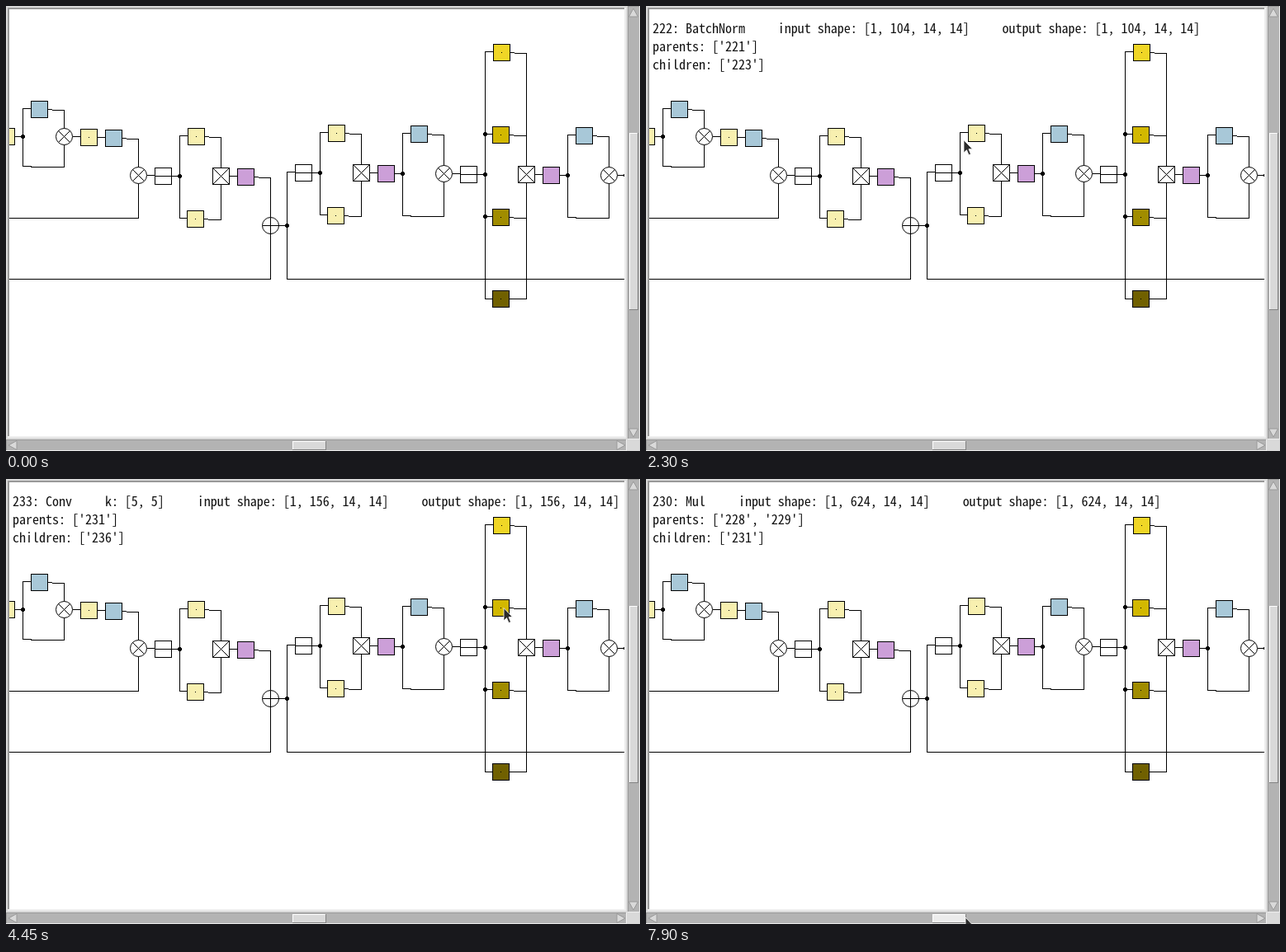
These frames come from a looping animation (768x540 px, 8000 ms). An HTML page:

```html
<!DOCTYPE html>
<html lang="en">
<head>
<meta charset="utf-8">
<title>Network graph viewer</title>
<style>
  html, body { margin: 0; width: 100%; height: 100%; overflow: hidden; background: #d9d9d9; }
  svg { position: absolute; left: 0; top: 0; }
  pre {
    position: absolute; left: 8px; top: 15px; margin: 0; color: #111;
    font: 16px/22px "Noto Sans Mono CJK JP", "Noto Sans Mono CJK SC", "Liberation Mono", monospace;
  }
</style>
</head>
<body>
<svg id="scene" width="768" height="540" shape-rendering="crispEdges"></svg>
<pre id="info"></pre>
<svg width="768" height="540">
  <path id="cursor" d="M0 0V15.5L3.5 12 6 18 8.5 17 6 11H10.5Z" fill="#2b2b2b" stroke="#fff" stroke-width=".8"/>
</svg>
<script>
const YELLOW = '#f8f0b0', BLUE = '#a8c8d8', PURPLE = '#cc9fd8';
let wires = '', nodes = '';

// --- graph parts ---
const wire = d => wires += d;
const link = (x, y) => wire(`M${x} ${y}h10`);
const dot = (x, y) => nodes += `<circle cx="${x}" cy="${y}" r="2.5" fill="#000" stroke="none"/>`;
const mark = d => nodes += `<path d="${d}" fill="none"/>`;
const box = (x, y, fill = '#fff') =>
  nodes += `<rect x="${x - 10}" y="${y - 10}" width="20" height="20" fill="${fill}"/>`;
const ring = (x, y) =>
  nodes += `<circle cx="${x}" cy="${y}" r="10" fill="#fff" shape-rendering="auto"/>`;
const cross = (x, y, r) => mark(`M${x - r} ${y - r}l${2 * r} ${2 * r}m0 ${-2 * r}l${-2 * r} ${2 * r}`);

function conv(x, y, fill = YELLOW) {
  box(x, y, fill);
  mark(`M${x - .5} ${y}h1`);
}
function mul(x, y) {
  ring(x, y);
  cross(x, y, 7);
}
function concat(x, y) {
  box(x, y);
  cross(x, y, 10);
}
function add(x, y) {
  ring(x, y);
  mark(`M${x - 10} ${y}h20m-10 -10v20`);
}
function split(x, y) {
  wire(`M${x - 10} ${y}h30`);
  box(x, y);
  mark(`M${x - 10} ${y}h20`);
  dot(x + 20, y);
}
// Sigmoid gate: one path through a blue box, one around it, joined by a product
function gate(x, y, up) {
  const top = y - up;
  wire(`M${x} ${y}V${top - 1}h20v1L${x + 50} ${top + 1}V${y}`);
  wire(`M${x} ${y}V${y + up + 3}h10v1H${x + 50}V${y}`);
  dot(x, y);
  box(x + 20, top, BLUE);
  mul(x + 50, y);
}
function branch(x, y, cx, cy, fill, slope = 1) {
  wire(`M${x} ${y}V${cy - slope}H${cx}V${cy}L${x + 50} ${cy + slope}V${y}`);
  conv(cx, cy, fill);
}
// Concatenation followed by normalisation
function merge(x, y) {
  link(x + 10, y);
  concat(x, y);
  box(x + 30, y + 1, PURPLE);
}
function pair(x, y) {
  split(x, y);
  branch(x + 20, y, x + 40, y - 48);
  branch(x + 20, y, x + 39, y + 52);
  merge(x + 70, y);
}

// --- graph ---
conv(0, 158);
link(10, 158);
gate(20, 158, 33);
link(80, 158);
conv(100, 159);
link(110, 159);
wire('M130 160L160 161V257H0');
box(130, 160, BLUE);
mul(160, 205);
link(170, 205);
pair(190, 206);
wire('M290 207L320 208V331H0M330 266H340M350 201H340V331H760');
add(320, 266);
dot(340, 266);
pair(360, 202);
link(470, 203);
gate(480, 203, 48);
link(540, 203);
split(560, 204);
branch(580, 204, 600, 56, '#f0d626');
branch(580, 204, 599, 156, '#d2b800');
branch(580, 204, 599, 256, '#a08c00');
branch(580, 204, 599, 355, '#706000', 0);
dot(580, 155);
dot(580, 255);
merge(630, 204);
link(670, 205);
gate(680, 205, 48);
link(740, 205);
dot(750, 205);

// --- window ---
const rect = (x, y, w, h, fill, id = '') =>
  `<rect x="${x}" y="${y}" width="${w}" height="${h}" fill="${fill}" id="${id}"/>`;
const bevel = (x, y, w, h, fill, light, dark, b, id) =>
  rect(x, y, w, h, dark) + rect(x, y, w - b, h - b, light) +
  rect(x + b, y + b, w - 2 * b, h - 2 * b, fill, id);
const arrow = (x, y, turn) => `<g transform="translate(${x} ${y}) rotate(${turn})" shape-rendering="auto">
  <path d="M0 -5L5.5 5H-5.5Z" fill="#d9d9d9" stroke="#999"/></g>
  <path d="M${x - 5} ${y}" stroke="#fff"/>`;

const scene = document.getElementById('scene');
scene.innerHTML =
  bevel(2, 2, 749, 522, '#fff', '#999', '#eee', 2) +
  bevel(753, 0, 15, 526, '#b3b3b3', '#999', '#eee', 1) +
  bevel(0, 526, 752, 14, '#b3b3b3', '#999', '#eee', 1) +
  bevel(755, 154, 11, 215, '#d9d9d9', '#fff', '#828282', 1) +
  bevel(347, 528, 41, 11, '#d9d9d9', '#fff', '#828282', 1, 'thumb') +
  arrow(760, 8, 0) + arrow(760, 518, 180) + arrow(8, 533, -90) + arrow(745, 533, 90) +
  `<clipPath id="view"><rect x="4" y="4" width="745" height="518"/></clipPath>
  <g clip-path="url(#view)"><g transform="translate(.5 .5)" stroke="#000">
  <path d="${wires}" fill="none"/>${nodes}</g></g>`;

// --- hover details ---
const list = ids => `[${ids.map(id => `'${id}'`).join(', ')}]`;
const describe = (title, cin, cout, parents, children) =>
  `${title}     input shape: [1, ${cin}, 14, 14]     output shape: [1, ${cout}, 14, 14]\n` +
  `parents: ${list(parents)}\nchildren: ${list(children)}`;

const details = [
  [0, ''],
  [450, describe('223: Add', 104, 104, [194, 222], [224, 252])],
  [1250, describe('222: BatchNorm', 104, 104, [221], [223])],
  [2850, describe('232: Conv     k: [3, 3]', 156, 156, [231], [236])],
  [4350, describe('233: Conv     k: [5, 5]', 156, 156, [231], [236])],
  [5500, describe('231: Split', 624, 156, [230], [232, 233, 234, 235])],
  [6800, describe('230: Mul', 624, 624, [228, 229], [231])],
];

// --- pointer moves: start, end, x, y ---
const moves = [
  [0, 50, 340, 477],
  [50, 550, 316, 260],
  [750, 800, 314, 260],
  [1000, 1400, 294, 209],
  [2000, 2800, 581.5, 62.5],
  [2800, 2850, 593, 59],
  [2850, 2950, 604.5, 54.5],
  [3300, 3750, 589, 100],
  [3900, 4000, 591.5, 106.5],
  [4100, 4450, 603, 156.5],
  [4950, 5700, 565, 214],
  [6550, 6900, 535, 203.5],
  [7500, 7900, 387, 532],
];

function pointer(t) {
  let [, , x, y] = moves[0];
  for (const [start, end, toX, toY] of moves) {
    const p = Math.min(1, Math.max(0, (t - start) / (end - start)));
    const e = p * p * (3 - 2 * p);
    x += (toX - x) * e;
    y += (toY - y) * e;
  }
  return [x, y];
}

const info = document.getElementById('info');
const cursor = document.getElementById('cursor');
const thumb = document.getElementById('thumb');

// Pick the font size that gives an 8 px character cell
const pen = document.createElement('canvas').getContext('2d');
pen.font = '16px ' + getComputedStyle(info).fontFamily;
info.style.fontSize = 16 * 8 / pen.measureText('0').width + 'px';

function draw() {
  const t = Math.floor(performance.now() % 8000 / 50) * 50;
  const text = details.findLast(([start]) => t >= start)[1];
  if (info.textContent !== text) info.textContent = text;
  cursor.setAttribute('transform', `translate(${pointer(t)})`);
  cursor.style.visibility = t < 50 ? 'hidden' : 'visible';
  thumb.setAttribute('fill', t >= 7900 ? '#ececec' : '#d9d9d9');
  requestAnimationFrame(draw);
}
draw();
</script>
</body>
</html>
```
